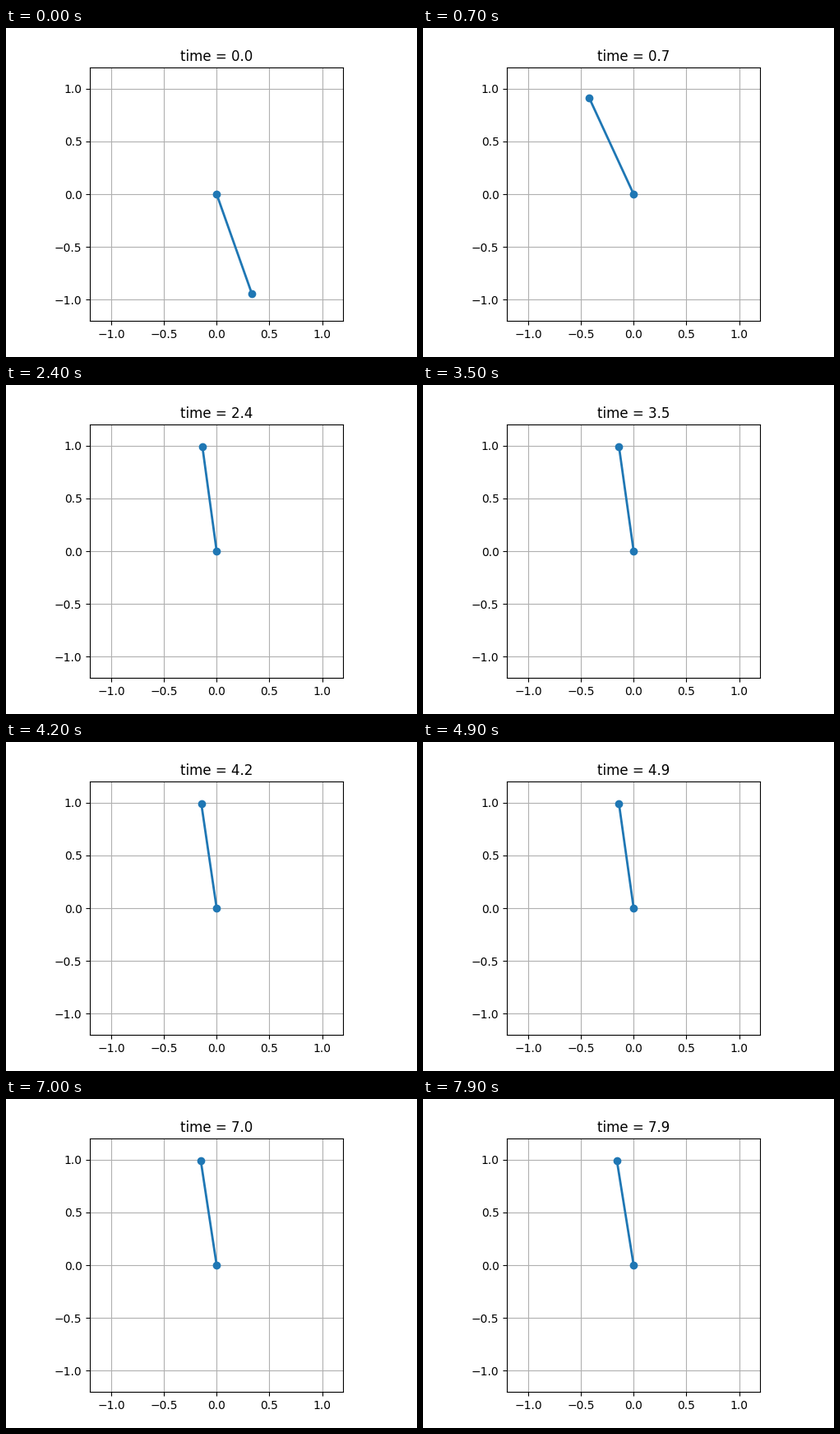
These frames come from a looping animation (500 px wide and 400 px high, 8000 ms). A matplotlib script:

```python
import matplotlib.pyplot as plt
import numpy as np
from matplotlib.animation import FuncAnimation

DT = 0.1
FRAMES = 80
START = 19.5  # degrees from straight down
RATE = 9.8
SETTLED = 1.4
SWAY_PERIOD = 1.2


def swing(t):
    """Smooth step response from 0 to 1 without overshoot."""
    x = RATE * t
    return 1 - (1 + x + x**2 / 2 + x**3 / 6) * np.exp(-x)


def lean(t):
    """Degrees left of upright: a slow drift with short, regular dips."""
    u = max(t - SETTLED, 0)
    return 7.65 + 0.1 * u + np.sin(np.pi * u / SWAY_PERIOD) ** 6


def angle(t):
    target = lean(t) - 180
    return np.radians(START + (target - START) * swing(t))


plt.rcParams["font.family"] = "DejaVu Sans"
fig, ax = plt.subplots(figsize=(5, 4), dpi=100)
ax.set_aspect("equal")
ax.set_xlim(-1.2, 1.2)
ax.set_ylim(-1.2, 1.2)
ticks = np.arange(-1, 1.1, 0.5)
ax.set_xticks(ticks)
ax.set_yticks(ticks)
ax.grid()
arm, = ax.plot([], [], "o-", lw=2, color="C0")
title = ax.set_title("time = 0.0")


def update(i):
    t = i * DT
    a = angle(t)
    arm.set_data([0, np.sin(a)], [0, -np.cos(a)])
    title.set_text(f"time = {t:.1f}")
    return arm, title


anim = FuncAnimation(fig, update, frames=FRAMES, interval=100, repeat=True, repeat_delay=0)
plt.show()
```
